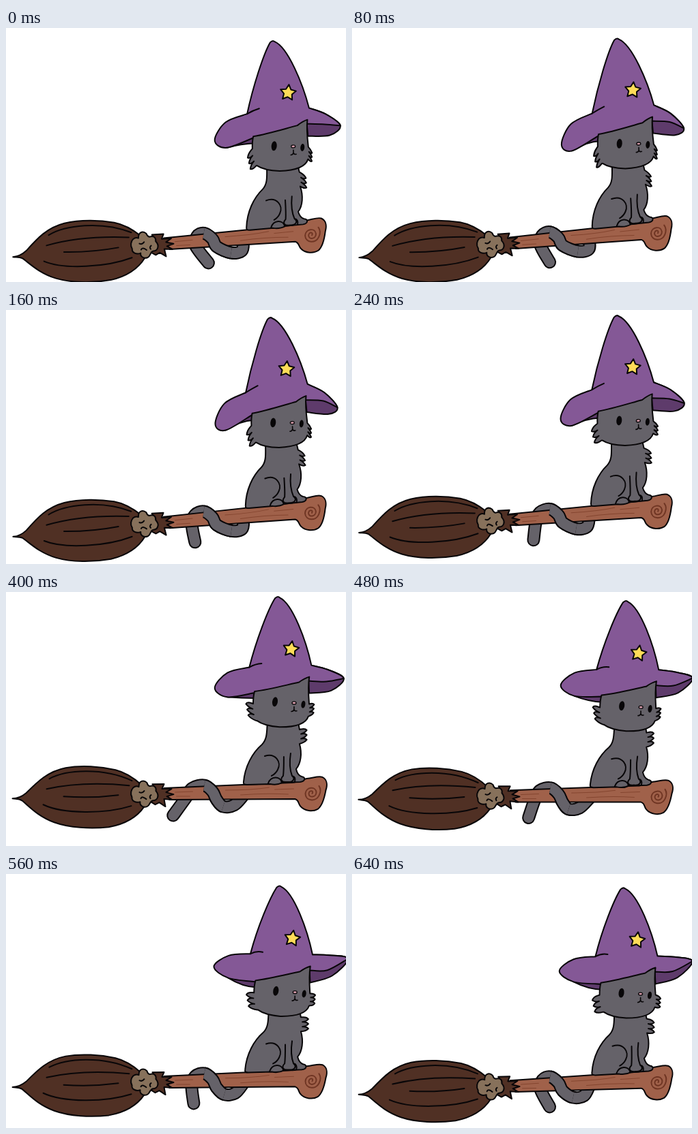
Animation of 498 by 373 pixels, one loop 0.72 s. Source, as an HTML page:

```html
<!DOCTYPE html>
<html lang="en">
<head>
<meta charset="utf-8">
<title>Cat on a broom</title>
<style>
  html, body { margin: 0; width: 100%; height: 100%; overflow: hidden; background: #fff; }
  svg { display: block; width: 100vw; height: 100vh; }
  path, ellipse { stroke: #080608; stroke-width: 2; stroke-linejoin: round; stroke-linecap: round; }
  .line { fill: none; }
  .brush { fill: #503024; }
  .wood { fill: #a0614a; }
  .grain { fill: none; stroke: #84452f; stroke-width: 1; }
  .spiral { fill: none; stroke: #6f3523; }
  .knot { fill: #87715b; }
  .fur { fill: #656269; }
  .hat { fill: #845896; }
  .under { fill: #5e3b6b; }
  .star { fill: #ffdc58; }
  .eye { fill: #080608; stroke: none; }
  .tailEdge { fill: none; stroke-width: 19; }
  .tailFur { fill: none; stroke: #656269; stroke-width: 15; }
  .front { stroke-linecap: butt; }
</style>
</head>
<body>
<svg viewBox="0 0 498 373">
  <g id="broom">
    <path id="tailEdge" class="tailEdge"/>
    <path id="tailFur" class="tailFur"/>
    <path class="wood" d="M232 288L300 285L418 280C427 280 431 276 441 274C451 273 458 270 464 272C470 275 472 282 469 291C467 302 464 314 457 319C450 323 438 322 432 315C428 311 430 306 424 304L240 305Z"/>
    <path class="grain" d="M248 294L274 293M322 291Q360 291 386 287M344 298Q380 295 414 297M394 290L422 289M250 300L270 300"/>
    <path class="spiral" d="M449 296C452 292 445 290 444 296C444 303 455 302 455 294C454 285 440 286 439 296C439 307 454 309 459 299C462 293 461 288 459 285"/>
    <path class="brush" d="M208 284L219 288L215 282L232 282L229 289L243 289L235 294L246 297L236 300L244 305L232 304L234 315L225 309L219 312L211 307Z"/>
    <path class="brush" d="M10 303C18 303 24 300 30 295C47 278 62 263 88 258C111 254 139 256 161 261C177 265 188 273 199 283L203 315C192 331 174 341 151 345C124 348 93 346 71 338C47 329 35 315 24 306C19 303 14 304 10 303Z"/>
    <path class="line" d="M64 274C88 261 142 257 185 277M60 289C96 281 140 280 181 284M85 300Q126 303 165 298M55 312C84 326 146 326 184 314"/>
    <path class="knot" d="M187 287Q191 284 195 286C195 277 202 275 207 280Q208 284 211 285C218 283 221 287 220 292C226 299 222 306 216 306C211 306 212 313 207 315C201 317 196 313 197 308C191 310 184 307 185 301C182 296 184 290 187 287Z"/>
    <path class="line" d="M196 294Q200 296 203 292M198 303Q200 299 206 304M213 298Q210 300 212 303"/>
    <path id="bandEdge" class="tailEdge front"/>
    <path id="bandFur" class="tailFur front"/>
  </g>

  <g id="body">
    <path id="torso" class="fur"/>
    <path class="line" d="M378 241C394 236 403 250 397 261Q394 267 388 270M383 281C387 270 401 270 403 280M406 242C406 256 406 263 405 270C400 275 402 280 411 279C420 280 423 274 418 270C415 262 414 250 416 237M418 270Q424 271 422 279"/>
  </g>

  <g id="head">
    <path id="brimUnder" class="under"/>
    <path id="brimShade" class="under"/>
    <path id="hat" class="hat"/>
    <path id="crease" class="line"/>
    <path id="star" class="star"/>
    <g transform="translate(-421 -162)">
      <path id="face" class="fur"/>
      <ellipse class="eye" cx="393" cy="160" rx="4" ry="7" transform="rotate(8 393 160)"/>
      <ellipse class="eye" cx="434.5" cy="163.5" rx="3" ry="5.5" transform="rotate(8 434 163)"/>
      <ellipse cx="421" cy="161.5" rx="3" ry="2" fill="#d79cab" style="stroke-width:1.3"/>
      <path class="line" style="stroke-width:1.6" d="M421 167L421 171M417 174Q420 174 421 171Q422 174 425 173"/>
    </g>
  </g>
</svg>

<script>
const STEP = 80;
// Hand-timed beats of one bob, in ninths of a turn.
const beats = [0.4, 1.2, 2, 2.6, 3.3, 5, 6.2, 7.1, 8];

const $ = id => document.getElementById(id);
const set = (id, d) => $(id).setAttribute('d', d);
const move = (id, t) => $(id).setAttribute('transform', t);
const off = (p, x, y) => [p[0] + x, p[1] + y];

// Smooth curve through points, as a list of cubic segments.
function curve(pts) {
  const at = i => pts[Math.max(0, Math.min(pts.length - 1, i))];
  return pts.slice(1).map((p, i) => {
    const q = pts[i], before = at(i - 1), after = at(i + 2);
    const c1 = q.map((v, k) => v + (p[k] - before[k]) / 6);
    const c2 = p.map((v, k) => v - (after[k] - q[k]) / 6);
    return `C${c1} ${c2} ${p}`;
  });
}

// Row of pointed fur locks between two points.
function fluff(a, b, count, deg, len) {
  const r = deg * Math.PI / 180, dx = Math.cos(r) * len, dy = Math.sin(r) * len;
  const at = t => [a[0] + (b[0] - a[0]) * t, a[1] + (b[1] - a[1]) * t];
  let d = `L${a}`;
  for (let i = 0; i < count; i++) {
    const from = at(i / count), to = at((i + 1) / count);
    const tip = off(at((i + 0.5) / count), dx, dy);
    d += `Q${off(from, dx * 0.7, dy * 0.7)} ${tip}` +
      `Q${off(to, dx * 0.8, dy * 0.8)} ${off(to, dx * 0.2, dy * 0.2)}`;
  }
  return d + `L${b}`;
}

function starPath([x, y], turn) {
  let d = '';
  for (let i = 0; i < 10; i++) {
    const r = i % 2 ? 6.2 : 12, a = (turn + i * 36 - 90) * Math.PI / 180;
    d += (i ? 'L' : 'M') + [x + r * Math.cos(a), y + r * Math.sin(a)];
  }
  return d + 'Z';
}

// Hat points are measured from the nose; both brim sides share one flap.
function drawHat(flap) {
  const tip = [-25, -156], right = [25, -56], left = [-66, -52 + flap * 0.25];
  const ear = [21, -33], temple = [-58, -15];
  const leftEdge = [
    temple,
    [-98, -7 + flap * 0.8],
    [-116 + flap * 0.2, -20 + flap],
    [-98, -43 + flap * 0.6],
    left
  ];
  const end = [72 - flap * 0.3, -35 + flap * 0.95];
  const rightEdge = curve([right, [49, -49 + flap * 0.4], end, [54, -18 + flap * 0.45], [22, -15]]);
  const rim = curve([end, [47, -32 + flap * 0.1], ear]);

  set('brimUnder', `M${right}${rightEdge.join('')}L${ear}Z`);
  set('brimShade', `M${leftEdge[1]}Q${off(temple, -18, 8)} ${off(temple, 2, 8)}L${temple}Z`);
  set('hat', `M${right}${rightEdge.slice(0, 2).join('')}${rim.join('')}L${temple}` +
    curve(leftEdge).join('') +
    `C${off(left, 10, -40)} ${off(tip, -14, 18)} ${off(tip, -4, 2)}` +
    `Q${off(tip, 0, -2)} ${off(tip, 3, 1)}` +
    `C${off(tip, 22, 10)} ${off(right, -8, -36)} ${right}Z`);
  set('crease', `M${left}Q${off(left, 9, -5)} ${off(left, 18, -6 - flap * 0.2)}`);
  set('star', starPath([-5, -79.5], 8));
}

function drawTail(slide, swing) {
  const crest = [291, 284];
  const loop = [[303, 293], [309, 305], [320 + slide, 315], [336 + slide, 313], [348, 299]];
  const back = [[277 + swing * 0.15, 288], [271 + swing * 0.28, 302], [270 + swing, 328]];
  const parts = curve([...loop.slice().reverse(), crest, ...back]);
  const start = loop[loop.length - 1], low = loop[2];
  const whole = `M${start}${parts.join('')}`;
  const band = `M${low}${parts.slice(2, 5).join('')}`;
  set('tailEdge', whole);
  set('tailFur', whole);
  set('bandEdge', band);
  set('bandFur', band);
}

function drawFur(droop) {
  set('torso', 'M382 190C381 205 382 216 374 224C360 236 349 256 347 279Q346 283 352 283' +
    'L386 282Q396 284 404 280L430 279' +
    'C438 278 438 272 432 271Q426 269 424 260C431 252 433 237 429 223' +
    fluff([429, 223], [429, 202], 3, droop * 0.7, 11) + 'L427 190Z');
  set('face', 'M363 145C385 142 410 135 428 131Q436 125 443 123C441 136 442 150 443 162' +
    fluff([443, 163], [442, 181], 3, droop, 8) +
    'C438 193 420 197 400 197C385 196 374 193 367 188' +
    fluff([366, 188], [361, 163], 3, 180 - droop, 12) + 'Q361 152 363 145Z');
}

function draw(beat) {
  const turn = beat / 9 * 2 * Math.PI;
  const wave = (mid, c, s) => mid + c * Math.cos(turn) + s * Math.sin(turn);

  const ride = `translate(203.5 ${wave(307.2, 10.1, 4.6)}) ` +
    `rotate(${wave(-1.7, -1.1, -1.8)}) translate(-204 -296)`;
  move('broom', ride);
  move('body', `translate(${wave(4.2, 2.5, 1.1)} 0) ${ride}`);
  move('head', `translate(${wave(421.3, 0, -2)} ${wave(168.7, 7, -3.9)}) ` +
    `rotate(${wave(-0.8, -0.6, -1.8)})`);

  drawTail(wave(4, 4, 5), wave(0, 26, 1));
  drawFur(wave(15, 26, 27));
  drawHat(14.7 * Math.sin(turn) + 4.8 * Math.sin(2 * turn));
}

const start = performance.now();
let shown = -1;
function frame(now) {
  const step = Math.floor(Math.max(0, now - start) / STEP) % beats.length;
  if (step !== shown) draw(beats[shown = step]);
  requestAnimationFrame(frame);
}
frame(start);
</script>
</body>
</html>
```
